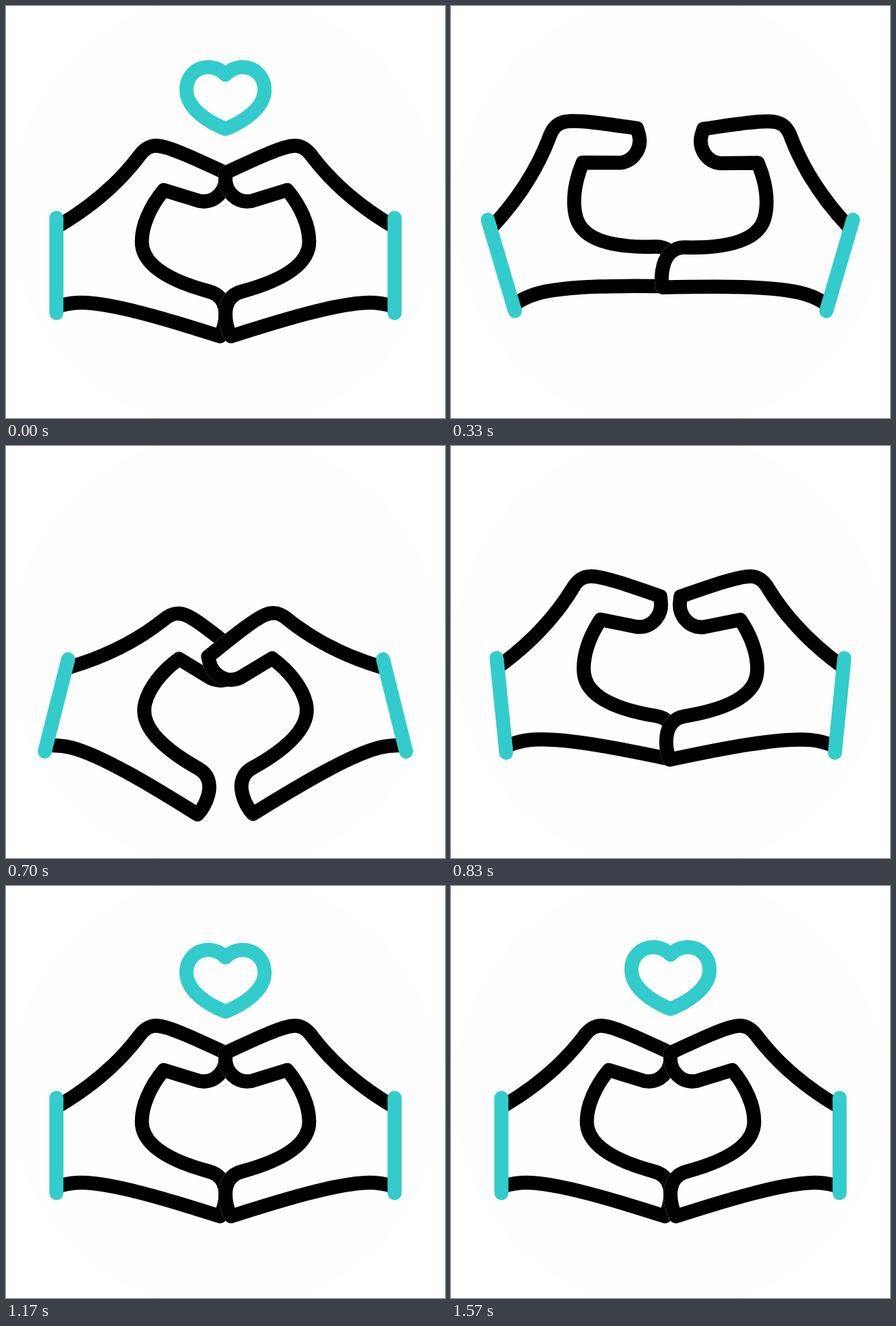
An HTML page for the animation above (1.67 s loop, 640 by 600 pixels).

```html
<!DOCTYPE html>
<html lang="en">
<head>
<meta charset="utf-8">
<title>Heart hands</title>
<style>
  html, body { margin: 0; width: 100%; height: 100%; overflow: hidden; background: #fff; }
  svg { display: block; width: 640px; height: 600px; }
  path { stroke-width: 20.5; stroke-linecap: round; stroke-linejoin: round; }
  .skin { fill: #fefefe; stroke: #fefefe; }
  .line { fill: none; stroke: #000; }
  .teal { fill: none; stroke: #3cc; }
</style>
</head>
<body>
<svg viewBox="0 0 640 600">
  <defs>
    <path id="outline" d="M563 320 C524 297 480 263 447 220
      C438 207 429 202 416 204 C400 206 365 222 320 243
      L320 252 C320 270 336 288 358 284 L410 268
      C430 292 442 320 442 343 C442 380 395 402 343 416
      C328 420 320 432 320 449 C320 462 323 472 328 481
      C400 458 485 432 530 432 C540 432 550 433 563 437"/>
    <g id="hand">
      <use href="#outline" class="skin"/>
      <use href="#outline" class="line"/>
      <path class="teal" d="M566.5 308.5 V447"/>
    </g>
  </defs>
  <circle cx="320" cy="300" r="317" fill="#fefefe"/>
  <g transform="matrix(-1 0 0 1 640 0)"><use id="left" href="#hand"/></g>
  <use id="right" href="#hand"/>
  <path id="heart" class="teal" d="M320 100 C313 93 304 89 295 89 C277 89 263 103 263 122
    C263 150 297 170 320 179 C343 170 377 150 377 122 C377 103 363 89 345 89 C336 89 327 93 320 100 Z"/>
</svg>
<script>
  const LOOP = 1670, STEP = 33.334;
  const [left, right, heart] = ['left', 'right', 'heart'].map(id => document.getElementById(id));

  // Keys are [step, value...]
  const swingKeys = [[0, 0], [8.9, 17.2], [19.1, -18], [25.5, 6], [33.5, 0]];
  const heartKeys = [[0, 0, 1], [6, -82, 0], [6.01, 55, 0], [27, 55, 0], [32, 5, 1], [47, 0, 1]];

  // Same curve as cubic-bezier(.5, 0, .5, 1)
  function ease(x) {
    let lo = 0, hi = 1;
    for (let i = 0; i < 20; i++) {
      const p = (lo + hi) / 2;
      if (1.5 * p * (1 - p) + p ** 3 < x) lo = p; else hi = p;
    }
    return lo * lo * (3 - 2 * lo);
  }

  function sample(keys, step, curve = u => u) {
    const next = keys.findIndex(key => key[0] > step);
    if (next < 0) return keys[keys.length - 1].slice(1);
    const a = keys[next - 1], b = keys[next];
    const u = curve((step - a[0]) / (b[0] - a[0]));
    return a.slice(1).map((v, i) => v + (b[i + 1] - v) * u);
  }

  function draw(now) {
    const step = Math.floor((now % LOOP + 3.4) / STEP);
    const [angle] = sample(swingKeys, step, ease);
    const [drop, alpha] = sample(heartKeys, step);
    left.setAttribute('transform', `rotate(${angle} 566.5 378)`);
    right.setAttribute('transform', `rotate(${angle * 0.985} 566.5 378)`);
    heart.setAttribute('transform', `translate(0 ${drop})`);
    heart.setAttribute('opacity', alpha);
  }

  const start = performance.now();
  function tick() {
    draw(performance.now() - start);
    requestAnimationFrame(tick);
  }
  tick();
</script>
</body>
</html>
```
